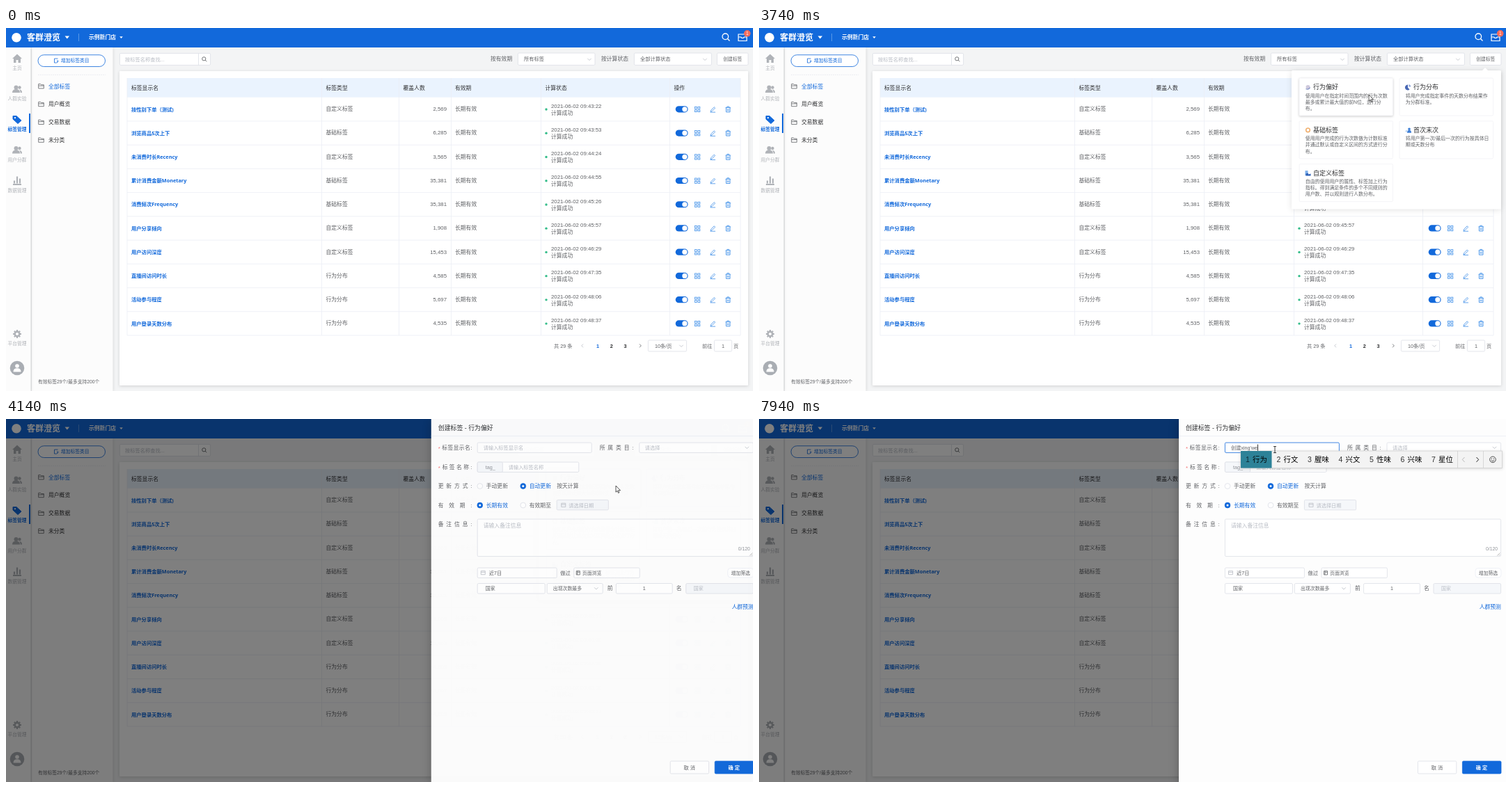
Animation of 1073 by 522 pixels, one loop 8000 ms. Source, as an HTML page:

```html
<!DOCTYPE html>
<html lang="zh-CN">
<head>
<meta charset="utf-8">
<title>标签管理</title>
<style>
html, body { margin: 0; width: 100%; height: 100%; overflow: hidden; }
svg { display: block; width: 1073px; height: 522px; background: #f3f4f5;
  font-family: "Liberation Sans", "Noto Sans CJK SC", "Noto Sans CJK", sans-serif; }
text { white-space: pre; }
.name { font-family: "Noto Sans", "Noto Sans CJK SC", sans-serif; font-weight: 600; }
.soft { filter: drop-shadow(0 1px 2px rgba(0,0,0,.14)); }
.pop { filter: drop-shadow(0 1px 4px rgba(0,0,0,.11)); }
.drawer { filter: drop-shadow(0 3px 7px rgba(0,0,0,.25)); }
#create.on rect { stroke: #1269db; }
#create.on text { fill: #1269db; }
#card0.on rect { filter: drop-shadow(0 1px 1.5px rgba(0,0,0,.2)); }
</style>
</head>
<body>
<svg id="stage" viewBox="0 0 1073 522"></svg>
<script>
const BLUE = '#1269db', INK = '#303133', TEXT = '#606266', HINT = '#b9bdc5', LINE = '#dcdfe6', PALE = '#ebeef5';

// y is the vertical middle of the text
const T = (x, y, s, size = 7.8, fill = TEXT, extra = '') =>
  `<text x="${x}" y="${y + size * .37}" font-size="${size}" fill="${fill}" ${extra}>${s}</text>`;
const MID = 'text-anchor="middle"', END = 'text-anchor="end"', BOLD = 'font-weight="700"', MEDIUM = 'font-weight="500"';
const box = (x0, y0, x1, y1, fill = '#fff', stroke = LINE, rx = 1.5, extra = '') =>
  `<rect x="${x0}" y="${y0}" width="${x1 - x0}" height="${y1 - y0}" rx="${rx}" fill="${fill}" stroke="${stroke}" stroke-width=".8" ${extra}/>`;
const fill = (x0, y0, x1, y1, c, rx = 0, extra = '') => box(x0, y0, x1, y1, c, 'none', rx, extra);
const P = (d, stroke, width = .8, paint = 'none', extra = '') =>
  `<path d="${d}" fill="${paint}" stroke="${stroke}" stroke-width="${width}" ${extra}/>`;
const dot = (x, y, r, c, stroke = 'none', width = .8) =>
  `<circle cx="${x}" cy="${y}" r="${r}" fill="${c}" stroke="${stroke}" stroke-width="${width}"/>`;
const G = (id, s, extra = '') => `<g id="${id}" ${extra}>${s}</g>`;
const at = (x, y, s) => `<g transform="translate(${x} ${y})">${s}</g>`;
const chevron = (x, y) => P(`M${x - 2.7} ${y - 1.2}l2.7 2.7 2.7-2.7`, HINT);
const lens = (x, y, r, c, w) => dot(x - .7, y - .7, r, 'none', c, w) + P(`M${x + r * .6 - .3} ${y + r * .6 - .3}l${r * .75} ${r * .75}`, c, w);
// spreads the characters of a form label evenly up to its colon
const label = (x0, x1, y, s) => {
  const step = (x1 - 2.5 - x0) / (s.length - 1);
  return T([...s].map((_, i) => (x0 + i * step).toFixed(1)).join(' '), y, s);
};

const icons = {
  home: c => P('M-7 0L0-6.5 7 0H5v6H1.5V2h-3v4H-5V0z', 'none', 0, c),
  people: c => dot(-1.5, -2.5, 3, c) + P('M-7 5q0-5 5.5-5t5.5 5z', 'none', 0, c) +
    dot(3.5, -2.5, 2.2, c) + P('M4.8 5q0-3-1.6-4.6 3.8 0 3.8 4.6z', 'none', 0, c),
  tag: c => P('M-6-5h5L6 1.5 1 6-6-.5z', c, 1, c, 'stroke-linejoin="round"') + dot(-3, -2.3, 1.1, '#fff'),
  bars: c => P('M-6 5.5H6M-4 4V0M0 4V-6M4 4V-3', c, 2.2),
  gear: c => dot(0, 0, 3.4, 'none', c, 2.6) + P('M0-6v2M0 4v2M-6 0h2M4 0h2M-4.2-4.2l1.3 1.3M2.9 2.9l1.3 1.3M4.2-4.2L2.9-2.9M-2.9 2.9l-1.3 1.3', c, 2),
  folder: c => P('M-3.8 3.2v-6.4h2.8l1 1.2h3.8v5.2zM-3.8-.6h7.6', c, .8),
};

function header() {
  return fill(0, 0, 1073, 28, BLUE) + dot(15, 13.8, 6.8, '#fff') +
    T(30, 13.5, '客群澄览', 12, '#fff', BOLD) + P('M84.5 11.5h6.6l-3.3 4z', 'none', 0, '#fff') +
    fill(104.2, 8, 105, 19, '#6aa3ea') + T(119, 13.5, '示例新门店', 7.8, '#fff', BOLD) +
    P('M163.2 12.3h4.6l-2.3 2.6z', 'none', 0, '#fff') + lens(1034, 13, 4.3, '#fff', 1.3) +
    P('M1052 9h12v9.5h-12zM1052 13h3.5q2.5 3 5 0h3.5', '#fff', 1.2) +
    dot(1064.7, 7.8, 4.8, '#f56c5c') + T(1064.7, 7.8, '1', 6.5, '#fff', MID);
}

function sidebars() {
  const nav = [['home', '主页', 44, 58], ['people', '人群实验', 88, 102], ['tag', '标签管理', 131.5, 146],
    ['people', '用户分群', 175.5, 189.5], ['bars', '数据管理', 219.5, 233.5], ['gear', '平台管理', 440, 454]];
  const folders = ['全部标签', '用户概览', '交易数据', '未分类'];
  return fill(37, 27, 153.5, 522, '#fcfcfc', 0, 'class="soft"') + fill(0, 27, 35.5, 522, '#fcfcfc', 0, 'class="soft"') +
    nav.map(([icon, s, y, ty]) => {
      const on = icon == 'tag', c = on ? BLUE : '#b0b3b8';
      return at(16, y, icons[icon](c)) + T(16, ty, s, 6.75, c, MID + (on ? BOLD : ''));
    }).join('') +
    fill(33, 123, 35, 151, BLUE) +
    dot(16, 489, 10.3, '#a9adb3') + dot(16, 486, 2.8, '#fff') + P('M10.5 494.5q0-5.3 5.5-5.3t5.5 5.3z', 'none', 0, '#fff') +
    box(46, 38.7, 142.5, 55.5, '#fff', BLUE, 8.4) + P('M74.5 44h-5v6h3M72.5 50l3-2.5M74 46v3.5', BLUE, .8) +
    T(79, 47, '增加标签类目', 6.75, BLUE) + P('M46 67.3h97', '#e4e7ec', .7, 'none', 'stroke-dasharray="2 1"') +
    folders.map((s, i) => at(50.5, 83.7 + i * 25.8, icons.folder(TEXT)) + T(61, 83.7 + i * 25.8, s, 7.8, i ? INK : BLUE)).join('') +
    T(46, 509, '有效标签29个/最多支持200个', 6.75, TEXT);
}

function toolbar() {
  return box(163.4, 36.4, 293.6, 53.4) + P('M276.5 36.5v17', LINE) + T(171, 45, '按标签名称查找...', 7.25, HINT) + lens(285, 45, 2.6, TEXT, .9) +
    T(696, 44.5, '按有效期') + box(735.4, 36, 846, 53.4) + T(744, 44.7, '所有标签', 7.25) + chevron(838, 45) +
    T(855, 44.5, '按计算状态') + box(902.4, 36, 1013.4, 53.4) + T(911, 44.7, '全部计算状态', 7.25) + chevron(1004, 45) +
    G('create', box(1021.4, 36, 1066, 53.4) + T(1043.7, 44.7, '创建标签', 6.75, TEXT, MID));
}

const TOP = 99.7, ROW = 34.23;
const rows = [
  ['按性别下单（测试)', '自定义标签', '2,569', '43:22'], ['浏览商品5次上下', '基础标签', '6,285', '43:53'],
  ['未消费时长Recency', '自定义标签', '3,565', '44:24'], ['累计消费金额Monetary', '基础标签', '35,381', '44:55'],
  ['消费频次Frequency', '基础标签', '35,381', '45:26'], ['用户分享倾向', '自定义标签', '1,908', '45:57'],
  ['用户访问深度', '自定义标签', '15,453', '46:29'], ['直播间访问时长', '行为分布', '4,585', '47:35'],
  ['活动参与程度', '行为分布', '5,697', '48:06'], ['用户登录天数分布', '行为分布', '4,535', '48:37']];

function table() {
  const heads = [[180, '标签显示名'], [459.5, '标签类型'], [570.5, '覆盖人数'], [645, '有效期'], [774.5, '计算状态'], [959.5, '操作']];
  const bottom = TOP + ROW * rows.length, SKY = '#3f8fe8';
  const tools = fill(961.7, -4.6, 979.6, 4.6, BLUE, 4.6) + dot(974.9, 0, 3.6, '#fff') +
    [[989.5, -3.5], [994, -3.5], [989.5, 1], [994, 1]].map(([x, y]) => box(x, y, x + 2.8, y + 2.8, 'none', SKY, 0)).join('') +
    P('M1012 3.5l.6-2 4.6-4.7 1.4 1.4-4.6 4.7zM1011.5 4.3h7.5', SKY, .8) +
    P('M1033.5-2.2h7.4M1035.7-2.5v-1.3h3v1.3M1034.4-2v6h5.6v-6M1036.3-.3v2.8M1038.1-.3v2.8', SKY, .9);
  return fill(163, 62, 1066, 514, '#fff', 1, 'class="soft"') +
    fill(174, 72, 1055, TOP, '#eaf3fe') + fill(174, 0, 1055, ROW, '#f3f6fb', 0, 'id="hover"') +
    heads.map(([x, s]) => T(x, 86, s, 7.8, INK, MEDIUM)).join('') +
    rows.map(([name, kind, count, time], i) => {
      const y = TOP + ROW * (i + .5);
      return T(180, y, name, 7.3, BLUE, 'class="name"') + T(459.5, y - .5, kind) + T(633, y - .5, count, 7.8, TEXT, END) +
        T(645, y - .5, '长期有效') + dot(776, y + .2, 1.7, '#35bd8b') + T(783, y - 5, '2021-06-02 09:' + time) + T(783, y + 5, '计算成功') +
        at(0, y, tools) + P(`M174 ${y + ROW / 2}h881`, PALE);
    }).join('') +
    P([174, 453.5, 564.5, 639.5, 768.5, 953.5, 1055].map(x => `M${x} 72V${bottom}`).join(''), PALE);
}

function pager() {
  const y = 457;
  return T(787, y, '共 29 条', 7.25) + P('M829 454.5l-2.3 2.4 2.3 2.4', HINT) + P('M910 454.5l2.3 2.4-2.3 2.4', TEXT) +
    ['1', '2', '3'].map((s, i) => T(850 + i * 19.7, y, s, 7.25, i ? INK : BLUE, MID + BOLD)).join('') +
    box(922.4, 449, 977.6, 465) + T(932, y, '10条/页', 7.25) + chevron(970, y) +
    T(1000, y, '前往', 7.25) + box(1017.4, 449, 1042.6, 465) + T(1030, y, '1', 7.25, TEXT, MID) + T(1045, y, '页', 7.25);
}

function popover() {
  const cards = [
    ['行为偏好', ['使用用户在指定时间范围内的行为次数', '最多或累计最大值的前N位，进行分', '布。'], dot(0, 0, 3, '#cfc9dc') + P('M-3 2.5q4 2 6-2', '#7d8fc4', 1.2)],
    ['行为分布', ['将用户完成指定事件的天数分布结果作', '为分群标准。'], P('M-.5.5V-3.5a4 4 0 1 0 2.5 7z', 'none', 0, '#4a69b5') + P('M.8-.6v-3.2a3.4 3.4 0 0 1 3 3.2z', 'none', 0, '#8ea5dc')],
    ['基础标签', ['使用用户完成的行为次数做为计数标准', '并通过默认或自定义区间的方式进行分', '布。'], dot(0, 0, 2.8, '#fff', '#f0b070', 1.6)],
    ['首次末次', ['将用户第一次/最后一次的行为按具体日', '期或天数分布'], dot(1.5, -1.5, 1.8, '#3f7fd6') + P('M-1.5 4q0-4 3-4t3 4z', 'none', 0, '#3f7fd6') + dot(-2.5, 1.5, 1.4, '#b8d4f2')],
    ['自定义标签', ['自由的使用用户的属性、标签加上行为', '指标。得到满足条件的多个不同规则的', '用户数、并以规则进行人数分布。'], fill(-4, -3.5, 0, 3.5, '#7fb0ea') + P('M-3 4V1l3-1 1 2 3-1v3z', 'none', 0, '#2f62b8')]];
  return P('M765 62.5q0-1.5 1.5-1.5H1039l4-4 4 4h17.5q1.5 0 1.5 1.5V259q0 1.5-1.5 1.5H766.5q-1.5 0-1.5-1.5z', 'none', 0, '#fff', 'class="pop"') +
    cards.map(([title, lines, icon], i) => {
      const x = 776 + i % 2 * 144, y = 72 + (i >> 1) * 61.8;
      return G('card' + i, box(x, y, x + 134.5, y + 54, '#fff', '#f1f2f5') + at(x + 12.5, y + 13, icon) + T(x + 20, y + 13, title, 9, INK) +
        lines.map((s, k) => T(x + 8.7, y + 25 + k * 9.1, s, 6.95)).join(''));
    }).join('');
}

function drawer() {
  const radio = (x, y, on) => dot(x, y, 3.9, on ? BLUE : '#fff', on ? BLUE : LINE) + (on ? dot(x, y, 1.5, '#fff') : '');
  const calendar = (x, y) => P(`M${x - 3} ${y - 2.5}h6v5.2h-6zM${x - 3} ${y - .6}h6`, HINT);
  const star = y => T(613, y + 1, '*', 7.8, '#f56c6c');
  return fill(603, 0, 1080, 522, '#fdfdfd', 0, 'class="drawer"') + T(613, 13, '创建标签 - 行为偏好', 8.9, INK, MEDIUM) + P('M603 24.5h470', PALE) +
    star(41) + label(618.5, 662, 41, '标签显示名:') + box(669.4, 34, 833.4, 48.4, '#fff', LINE, 1.5, 'id="field"') +
    G('entry', T(678, 41.3, '请输入标签显示名', 7.2, HINT)) + fill(0, 36.5, .8, 46, '#000', 0, 'id="caret"') +
    label(845, 894, 41, '所属类目:') + box(902, 34, 1065.6, 48.4) + T(910, 41.3, '请选择', 7.2, HINT) + chevron(1056.5, 41) +
    star(69) + label(619, 662, 69, '标签名称:') + box(669.4, 62, 815, 76.4) + box(669.4, 62, 705.5, 76.4, '#f5f7fa') +
    T(681, 69, 'tag_', 7.2, '#909399') + T(714, 69.3, '请输入标签名称', 7.2, HINT) +
    label(613, 662, 96, '更新方式:') + radio(673, 96.5) + T(682, 96, '手动更新') + radio(735, 96.5, 1) + T(744, 96, '自动更新', 7.8, BLUE) + T(783.5, 96, '按天计算') +
    label(613, 662, 123.7, '有效期:') + radio(673, 124, 1) + T(682, 123.7, '长期有效', 7.8, BLUE) + radio(735, 124) + T(744, 123.7, '有效期至') +
    box(783.4, 116.4, 857.6, 130.8, '#f5f7fa') + calendar(793, 123.7) + T(800.5, 124, '请选择日期', 7.2, HINT) +
    label(613, 662, 151, '备注信息:') + box(669.4, 144, 1065.6, 197.6) + T(678, 153.3, '请输入备注信息', 7.8, HINT) + T(1061, 187, '0/120', 6.75, '#909399', END) +
    P('M1060.5 196.5l4-4M1063 196.5l1.5-1.5', '#888', .6) +
    box(669.4, 214, 783.4, 228.4) + calendar(677.5, 221) + T(686, 221.3, '近7日', 7.2) + T(788.5, 221, '做过', 7.2) +
    box(808, 214, 902.4, 228.4) + P('M811.5 218.5h5v5.5h-5zM813 218.5v5.5M813 220.3h3.5', TEXT) + T(820, 221.3, '页面浏览', 6.9) +
    box(1029, 214.5, 1066, 228, '#fff', PALE, 4) + T(1047.5, 221.3, '增加筛选', 6.8, TEXT, MID) +
    box(669.4, 236.5, 766.4, 251) + T(681, 243.8, '国家', 6.9) + box(769.4, 236.5, 849.4, 251) + T(778, 243.8, '出现次数最多', 6.9) + chevron(840, 243.5) +
    T(856, 243.5, '前') + box(868.6, 236.5, 949.4, 251) + T(909, 243.8, '1', 7.2, TEXT, MID) + T(955, 243.5, '名') +
    box(969, 236.5, 1065.6, 251, '#f5f7fa') + T(980, 243.8, '国家', 6.9, HINT) + T(1034.7, 270.5, '人群预测', 7.8, BLUE) +
    box(946.4, 492, 1001.8, 510) + T(974, 501.3, '取 消', 7.2, TEXT, MID) + box(1010.4, 492, 1066, 510, BLUE, BLUE) + T(1038, 501.3, '确 定', 7.2, '#fff', MID + BOLD);
}

function inputMethod(x, words, fuzzy) {
  let cx = x, cells = '';
  words.forEach((word, i) => {
    const w = 23.9 + 10.3 * word.length;
    if (!i) cells += fill(cx, 46, cx + w, 70.5, '#2d8298');
    cells += T(cx + 7, 58.5, i + 1, 10.5, i ? '#333' : '#0d2a33') + T(cx + 17, 58.5, word, 10.4, '#000');
    cx += w;
  });
  const nav = Math.max(cx, fuzzy ? x + 262 : 0), right = nav + 64, bottom = fuzzy ? 88.6 : 70.6;
  return box(x, 46, right, bottom, '#f3f3f3', '#cfcfcf', 0, 'class="soft"') + cells +
    P(`M${nav} 46v24.5M${nav + 37} 46v24.5`, '#d0d0d0') +
    P(`M${nav + 10} 55l-3.2 3.4 3.2 3.4`, '#aaa') + P(`M${nav + 27} 55l3.2 3.4-3.2 3.4`, '#222', 1) +
    dot(nav + 50.5, 58.3, 4.3, 'none', '#222') + dot(nav + 49, 57.2, .6, '#222') + dot(nav + 52, 57.2, .6, '#222') + P(`M${nav + 48.3} 59.5q2.2 2.4 4.4 0`, '#222') +
    (fuzzy ? P(`M${x} 70.6H${right}`, '#d8d8d8') + T(x + 7, 80, `点击前往设置页面开启模糊音&lt;${fuzzy}&gt;。`, 6.9, '#16404c') + T(right - 7, 80, '不再提示', 6.9, '#16404c', END) : '');
}

// start time, committed text, letters being typed, candidates, fuzzy sound
const typing = [
  [6070, '', 'c', '才 从 次 出 成 吃 车'],
  [6180, '', 'ch', '出 吃 成 车 长 穿 差'],
  [6300, '', 'chu', '出 处 除 初 楚 触 储'],
  [6430, '', 'chua', '穿 传 川 串 船 喘 钏'],
  [6540, '', 'chuan', '穿 传 川 串 船 喘 钏', 'an,ang'],
  [6680, '', 'chuang', '床 创 窗 闯 疮 幢 怆', 'an,ang'],
  [6810, '', "chuang'j", '创建 创举 窗景 床具 闯进 创见 闯将'],
  [6920, '', "chuang'ji", '创机 创纪 创记 床几 创击 窗机 闯记'],
  [7000, '', "chuang'jia", '床架 创佳 创家 窗架 创价 闯家 创加'],
  [7080, '', "chuang'jian", '创建 创见 床间 窗间 创健 创鉴 闯建'],
  [7190, '创建', ''],
  [7500, '创建', 'x', '想 下 小 新 学 写 先'],
  [7740, '创建', 'xi', '系 西 洗 喜 细 戏 吸'],
  [7790, '创建', 'xin', '新 心 信 欣 辛 芯 薪', 'in,ing'],
  [7840, '创建', 'xing', '行 性 姓 型 星 兴 醒', 'in,ing'],
  [7890, '创建', "xing'w", '行为 兴旺 性味 星网 腥味 兴文 星位'],
  [7930, '创建', "xing'we", '行为 行文 腥味 兴文 性味 兴味 星位']];

const stage = document.getElementById('stage');
stage.innerHTML = sidebars() + toolbar() + table() + pager() + header() + G('popover', popover()) +
  fill(0, 0, 1073, 522, '#000', 0, 'id="shade"') + G('drawer', drawer()) + G('ime', '') +
  G('cursor',
    G('arrow', P('M0 0V9.2l2.1-2 1.4 3.2 1.4-.6-1.4-3.1h3z', '#111', .7, '#fff')) +
    G('hand', P('M2 1a1 1 0 0 1 2 0v3.5l4 .9q1 .3.8 1.5l-.6 3.1q-.2 1-1 1H4.2q-.7 0-1.1-.7L.3 7q.6-1 1.7.1z', '#111', .8, '#fff'), 'transform="translate(-3 0)"') +
    G('beam', P('M-2-4.5H2M0-4.5V4.5M-2 4.5H2', '#111', .8)));

const el = id => document.getElementById(id);
const set = (id, name, value) => el(id).setAttribute(name, value);
const show = (id, on) => set(id, 'opacity', +on);

// linear interpolation through [time, value] points
function track(t, points) {
  const i = points.findIndex(p => p[0] > t);
  if (i == 0) return points[0][1];
  if (i < 0) return points[points.length - 1][1];
  const [t0, a] = points[i - 1], [t1, b] = points[i];
  return a + (b - a) * (t - t0) / (t1 - t0);
}
const smooth = (t, t0, t1) => {
  const u = Math.min(1, Math.max(0, (t - t0) / (t1 - t0)));
  return u * u * (3 - 2 * u);
};

// start, end, x and y at the end of each pointer move
const moves = [[260, 1040, 1041, 76], [1040, 1300, 1039, 44], [2150, 2800, 876, 96], [4550, 5010, 741, 44]];
function pointer(t) {
  let x = 900, y = 526;
  for (const [t0, t1, x1, y1] of moves) {
    const u = smooth(t, t0, t1);
    x += (x1 - x) * u;
    y += (y1 - y) * u;
  }
  return [x, y];
}

let shown = -1;
function updateTyping(t) {
  const index = typing.findLastIndex(s => s[0] <= t);
  if (index != shown) {
    const [, done = '', letters = '', words, fuzzy] = typing[index] || [];
    const typed = done + letters;
    el('entry').innerHTML = typed ? T(678, 41.3, typed, 7.2, TEXT) : T(678, 41.3, '请输入标签显示名', 7.2, HINT);
    el('ime').innerHTML = words ? inputMethod(done ? 692 : 678.4, words.split(' '), fuzzy) : '';
    shown = index;
  }
  set('caret', 'x', 678 + (index < 0 ? 0 : el('entry').firstChild.getComputedTextLength()));
  show('caret', t >= 5010 && t < 5540 || t >= 6070);
}

function draw(now) {
  const t = now % 8000, [x, y] = pointer(t);
  const row = Math.floor((y - TOP) / ROW), overButton = x > 1021 && y < 54, overField = t > 4500 && x < 834 && y < 49;
  show('hover', t < 1100 && row >= 0 && row < rows.length);
  set('hover', 'y', TOP + ROW * row);
  el('create').classList.toggle('on', overButton);
  el('card0').classList.toggle('on', t >= 3740);
  set('popover', 'opacity', smooth(t, 1300, 1600));

  const slide = track(t, [[3888, 0], [3940, .209], [4020, .659], [4140, .983], [4180, 1]]);
  set('shade', 'opacity', track(t, [[3870, 0], [3940, .18], [4020, .45], [4080, .5]]));
  set('drawer', 'opacity', slide);
  set('drawer', 'transform', `translate(${469 * (1 - slide)} 0)`);
  set('field', 'stroke', t >= 5010 ? BLUE : LINE);
  updateTyping(t);

  set('cursor', 'transform', `translate(${x} ${y})`);
  show('hand', overButton);
  show('beam', overField);
  show('arrow', !overButton && !overField);
  requestAnimationFrame(draw);
}
requestAnimationFrame(draw);
</script>
</body>
</html>
```
